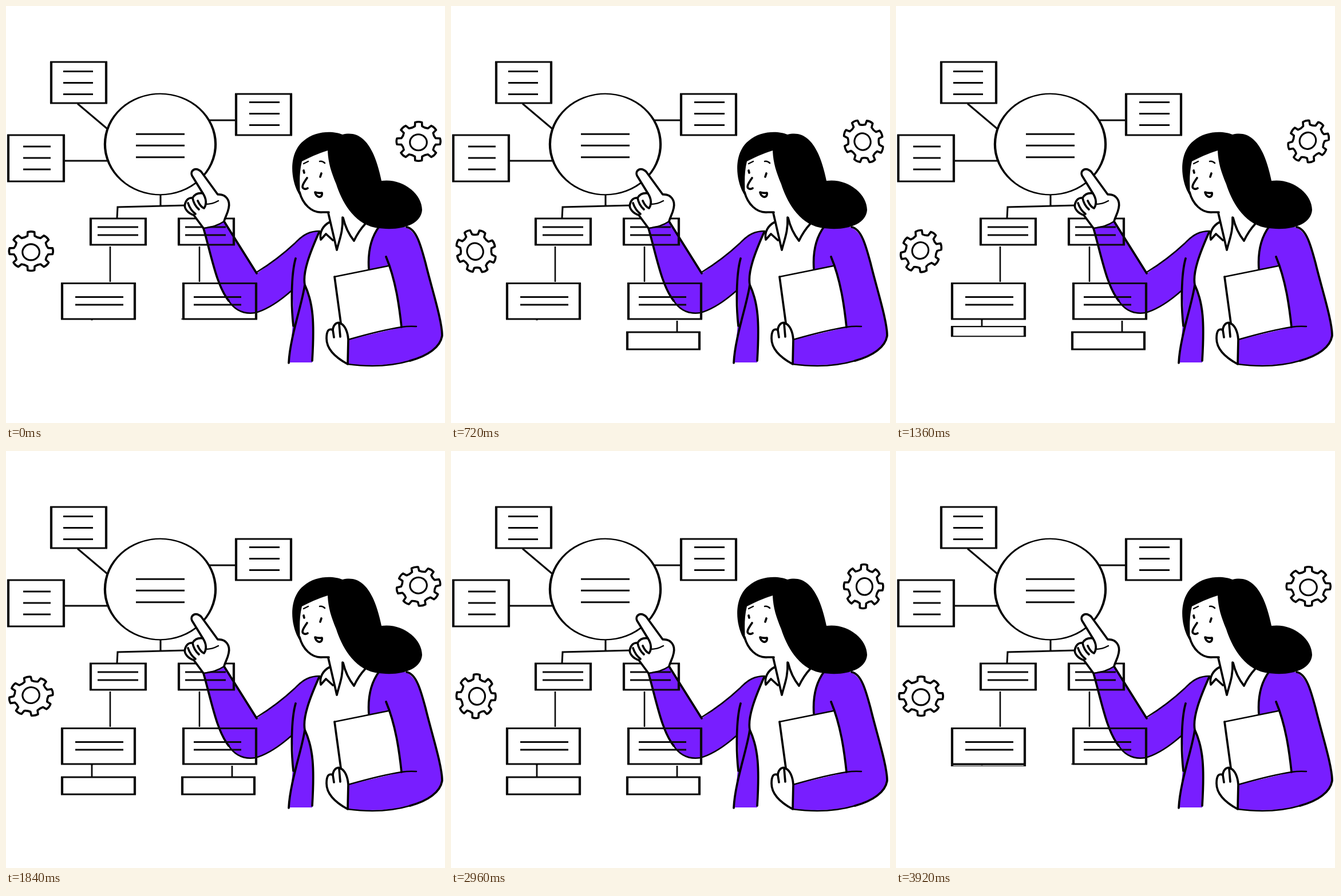
Recreate the animation shown at these times as an HTML page. Size 767 by 730 pixels, loop 4 s.

```html
<!DOCTYPE html>
<html lang="en">
<head>
<meta charset="utf-8">
<title>Presentation</title>
<style>
html, body { margin: 0; width: 100%; height: 100%; overflow: hidden; background: #fff; }
svg { display: block; width: 767px; height: 730px; }
.ink { fill: none; stroke: #000; stroke-width: 3.7; stroke-linecap: round; stroke-linejoin: round; }
.thin { stroke-width: 2.5; }
.white { fill: #fff; }
.purple { fill: #781eff; }
.link { fill: none; stroke: #0a0a0a; stroke-width: 3.1; }
</style>
</head>
<body>
<svg viewBox="0 0 767 730">
  <g id="gears"></g>

  <g id="jacket">
    <path class="purple" d="M345 389Q366 387 382 376L438 468Q474 444 505 415C520 399 532 395 548 394C531 432 518 466 522 488C537 520 539 555 535 624H494C497 590 505 555 500 498C475 521 446 540 420 538C378 528 368 472 345 389Z"/>
    <path class="purple" d="M652 386L690 386C714 386 724 418 733 450C743 492 762 550 762 577C758 612 690 636 597 627L598 584L691 562C688 520 680 480 668 455L634 463C632 432 638 406 652 386Z"/>
    <path class="ink" d="M345 389C360 442 368 489 389 516"/>
    <path class="ink thin" d="M389 516C400 533 416 540 436 537C460 530 480 515 498 499"/>
    <path class="ink" d="M381 377L438 468"/>
    <path class="ink thin" d="M438 466Q474 444 505 415C520 399 532 394 548 394"/>
    <path class="ink" d="M547 396C531 432 518 466 522 488C537 520 539 555 535 621M506 442C498 470 498 525 502 560M522 488C518 520 496 580 494 625"/>
    <path class="ink" d="M652 386C637 406 632 432 634 461M700 387C717 390 725 420 733 450C743 492 762 550 762 577C759 597 738 612 706 621"/>
    <path class="ink thin" d="M706 621C672 631 634 632 597 627"/>
  </g>

  <g id="chart"></g>
  <g id="leaves"></g>

  <g id="pointing">
    <path class="ink white" d="M345 389L328 366C318 363 310 354 313 346C315 339 320 335 326 336C330 329 337 327 344 328L325 297C321 288 331 281 341 290L370 330C385 329 392 341 389 354C387 364 383 369 381 377"/>
    <path class="ink thin" d="M345 389Q366 387 381 377M348 347C356 347 364 345 371 341"/>
    <path class="ink" d="M318 345Q322 357 331 364M326 336Q328 348 337 356M344 328C350 337 351 347 346 354Q340 352 335 341"/>
  </g>

  <g id="torso">
    <path class="ink" d="M563 362L578 427C583 407 589 395 588 370M566 378C554 384 547 396 550 409L559 399L571 410"/>
    <path class="ink" d="M589 371C593 388 600 401 608 411Q616 394 628 381"/>
    <path class="white" d="M574 474L668 455C685 495 688 530 691 562L598 584L585 556Z"/>
    <path class="ink thin" d="M574 474L668 455M598 584C640 572 665 566 691 562Q704 560 717 561"/>
    <path class="ink" d="M574 474L585 555M664 439C681 480 687 525 691 562"/>
    <path class="ink white" d="M597 627C575 615 560 600 560 582C560 568 564 564 571 567C572 556 580 552 585 556C592 559 597 570 598 584Z"/>
    <path class="ink" d="M571 567L573 580M582 556L584 579"/>
  </g>

  <g id="head">
    <path class="ink" d="M513 326C518 346 534 363 553 361L564 361"/>
    <path d="M514 333C497 308 492 258 520 236C540 218 572 218 588 225C628 215 646 258 656 306C692 301 727 328 727 357C725 385 685 395 645 388C606 380 586 340 577 312C568 290 563 275 562 253Q542 259 517 272C512 292 513 312 514 333Z"/>
    <path class="ink" d="M520 288L521 292M551 293L549 299M526 301C519 311 515 318 521 320Q524 321 527 319"/>
    <path class="ink thin" d="M520 276L528 272M548 272Q553 271 557 275"/>
    <path class="ink white" d="M540 326Q546 328 552 327C553 333 549 335 546 334Q541 332 540 326Z"/>
  </g>
</svg>
<script>
const LOOP = 4000, STEP = 80, TURN = 3920, GROW = 630;
const byId = id => document.getElementById(id);

function add(parent, d, cls = "link", width) {
  const el = document.createElementNS("http://www.w3.org/2000/svg", "path");
  el.setAttribute("d", d);
  el.setAttribute("class", cls);
  if (width) el.style.strokeWidth = width;
  parent.append(el);
  return el;
}

// Upright sides are heavier than the level ones.
const level = (x1, x2, ...ys) => ys.map(y => `M${x1} ${y}H${x2}`).join("");
const sides = (x1, x2, top, bottom) => `M${x1} ${top}V${bottom}M${x2} ${top}V${bottom}`;

const chart = byId("chart");
function box(x, y, w, h, lineX, lineEnd, ...rows) {
  add(chart, level(x - 2, x + w + 2, y, y + h));
  add(chart, sides(x, x + w, y, y + h), "link", 4.2);
  add(chart, level(lineX, lineEnd, ...rows));
}

box(79, 98, 96, 72, 100, 152, 114.5, 134.5, 154.5);
box(4, 226, 97, 81, 30, 78, 246, 266, 286);
box(402, 154, 96, 72, 425, 478, 168.5, 188.5, 208.5);
box(148, 372, 96, 46, 160, 231, 387, 401);
box(302, 372, 96, 46, 313, 384, 387, 401);
box(98, 485.5, 127, 62.5, 121, 205, 509.5, 523);
box(310, 485.5, 127, 62.5, 328, 411, 509.5, 523);
add(chart, level(227, 312, 224.3, 244.3, 264.7));

const ring = (rx, ry) => `M${269.5 - rx} 242a${rx} ${ry} 0 1 1 ${2 * rx} 0a${rx} ${ry} 0 1 1 ${-2 * rx} 0Z`;
add(chart, ring(98.7, 89.5) + ring(94.5, 87.2), "").setAttribute("fill-rule", "evenodd");
add(chart, "M125 171L177 215M103 271H179M354 200H402");
add(chart, "M270 331V349M194 371L195 352L314 349");
add(chart, "M182 421V483M338 421V483", "link", 2.6);
add(chart, "M148.5 549.5H151.5", "link", 1.6);

const BASE = 548;
const leaves = [
  { x1: 308, x2: 434, stem: 395, from: 551, open: 0, close: 3000 },
  { x1: 98, x2: 225, stem: 150, from: 548, open: 1000, close: 3333 }
].map(leaf => ({
  ...leaf,
  rows: add(byId("leaves"), ""),
  cols: add(byId("leaves"), "", "link", 4.2),
  rod: add(byId("leaves"), "", "link", 2.8)
}));

const clamp = v => Math.max(0, Math.min(1, v));

function drawLeaf(leaf, t) {
  const s = clamp((t - leaf.open) / GROW) - clamp((t - leaf.close) / GROW);
  const at = y => BASE + (y - BASE) * s;
  const top = at(571), bottom = at(601);
  leaf.rows.setAttribute("d", level(leaf.x1 - 2, leaf.x2 + 2, top, bottom));
  leaf.rows.style.strokeWidth = 0.8 + 2.3 * s;
  leaf.cols.setAttribute("d", sides(leaf.x1, leaf.x2, top, bottom));
  leaf.rod.setAttribute("d", `M${leaf.stem} ${at(leaf.from)}V${top}`);
}

function gearPath(teeth = 8) {
  const point = (r, deg) => {
    const a = deg * Math.PI / 180;
    return `${(r * Math.cos(a)).toFixed(1)} ${(r * 0.89 * Math.sin(a)).toFixed(1)}`;
  };
  const pitch = 360 / teeth;
  let d = "M" + point(30.5, -12);
  for (let i = 0; i < teeth; i++) {
    const a = i * pitch;
    d += `L${point(38, a - 9)}Q${point(39.5, a)} ${point(38, a + 9)}L${point(30.5, a + 12)}`;
    d += `Q${point(28.5, a + pitch / 2)} ${point(30.5, a + pitch - 12)}`;
  }
  return d + "Z";
}

const gears = [[720.7, 237], [43.8, 429.2]].map(([x, y]) => {
  const g = document.createElementNS("http://www.w3.org/2000/svg", "g");
  byId("gears").append(g);
  add(g, gearPath(), "ink", 3.6);
  add(g, "M-15 1.7a14.8 14 0 1 1 29.6 0a14.8 14 0 1 1 -29.6 0Z", "ink", 3.1);
  return { g, x, y };
});

function draw(now) {
  const t = Math.floor(now % LOOP / STEP) * STEP;
  for (const leaf of leaves) drawLeaf(leaf, t);
  for (const { g, x, y } of gears)
    g.setAttribute("transform", `translate(${x} ${y}) rotate(${360 * t / TURN})`);
}

const start = performance.now();
function tick() {
  draw(performance.now() - start);
  requestAnimationFrame(tick);
}
tick();
</script>
</body>
</html>
```
